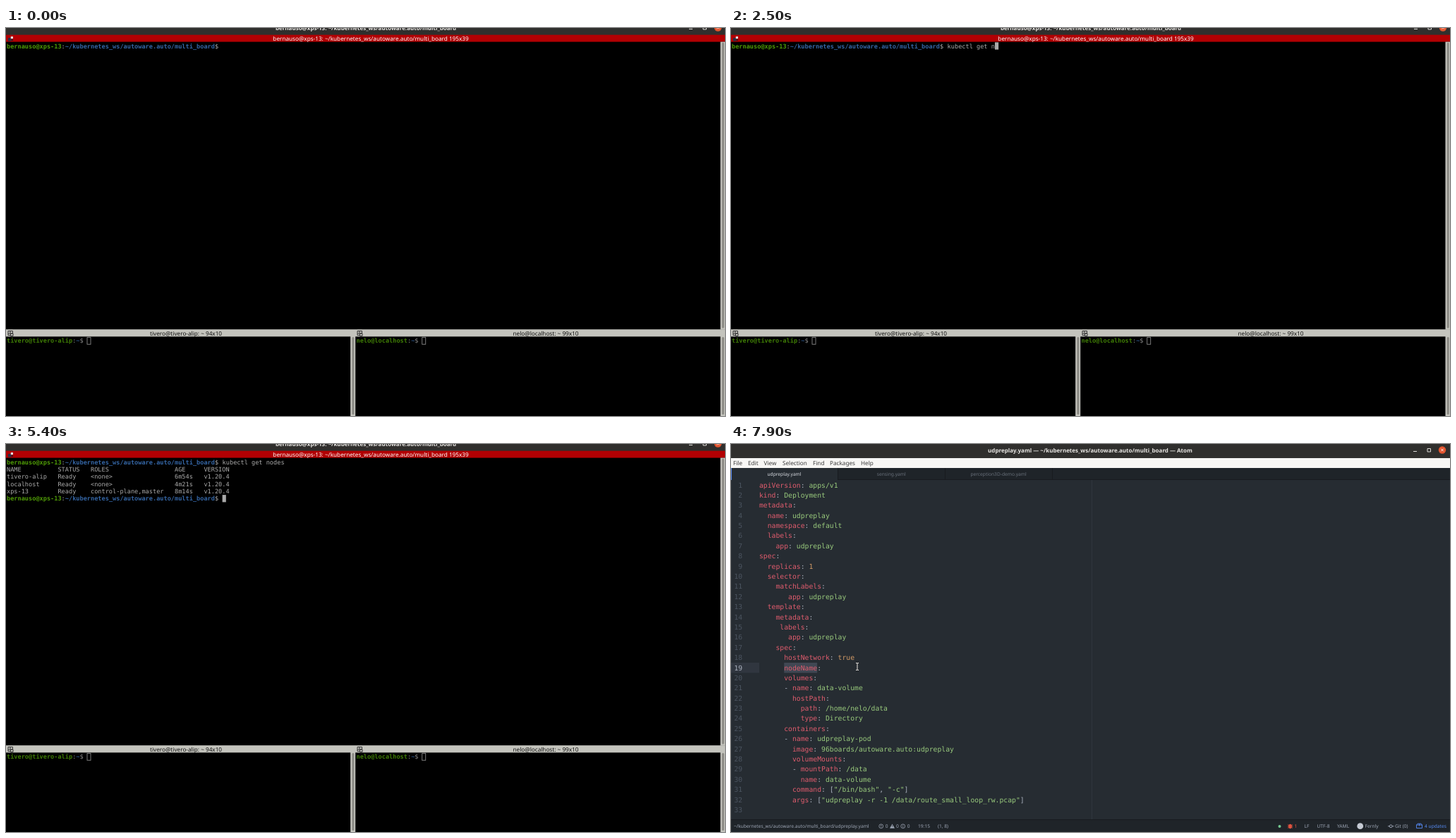
An HTML page for the animation above (8 s loop, 1019 by 550 pixels).

```html
<!DOCTYPE html>
<html lang="en">
<head>
<meta charset="utf-8">
<title>Cluster nodes</title>
<style>
  html, body { margin: 0; width: 1019px; height: 550px; overflow: hidden; background: #000; }
  svg { display: block; }
  text { white-space: pre; text-rendering: geometricPrecision; font-family: "Noto Sans", sans-serif; }
  .term, .code { font-family: "DejaVu Sans Mono", monospace; }
  .term { font-size: 8.604px; }
  .code { font-size: 9.75px; }
  .title { font-size: 8px; font-weight: bold; }
  .bar { font-size: 8.2px; }
  .small { font-size: 6.65px; }
  .b { font-weight: bold; }
</style>
</head>
<body>
<svg id="stage" width="1019" height="550" viewBox="0 0 1019 550"></svg>
<script>
const LOOP = 8000, EDITOR_AT = 6700, OUTPUT_AT = 3000;
const CELL = 5.18, ROW = 10.36, PROMPT_COLS = 59;
const CODE_CELL = 5.87, CODE_ROW = 14.39;
const FG = '#aaaaaa', DIM = '#888888', RED = '#df5c6d', GREEN = '#98c97c',
      ORANGE = '#d19a66', GREY = '#abb2bf', STATUS = '#9da5b4', BLUE = '#568af2', PANEL = '#c4c4bd';
const PATH = '~/kubernetes_ws/autoware.auto/multi_board';
const HOST = 'bernauso@xps-13';

const esc = s => s.replace(/&/g, '&amp;').replace(/</g, '&lt;');
const rect = (x, y, w, h, fill, extra = '') =>
  `<rect x="${x}" y="${y}" width="${w}" height="${h}" fill="${fill}" ${extra}/>`;
const circle = (x, y, r, fill, extra = '') =>
  `<circle cx="${x}" cy="${y}" r="${r}" fill="${fill}" ${extra}/>`;
const line = (d, stroke, w = 1) =>
  `<path d="${d}" fill="none" stroke="${stroke}" stroke-width="${w}"/>`;
const span = (s, fill, cls = '') => `<tspan fill="${fill}" class="${cls}">${esc(s)}</tspan>`;
const text = (x, y, cls, spans, extra = '') =>
  `<text x="${x}" y="${y}" class="${cls}" ${extra}>${spans}</text>`;
const label = (x, y, cls, s, fill, anchor = 'start') =>
  text(x, y, cls, span(s, fill), `text-anchor="${anchor}"`);

const colX = col => 1 + col * CELL;
const rowY = row => 28.6 + row * ROW;
const prompt = (x, y, host, path, green, blue, fg) => text(x, y, 'term',
  span(host, green, 'b') + span(':', fg) + span(path, blue, 'b') + span('$', fg));

function titleBar(s) {
  return rect(0, 0, 1019, 20, '#302f2d') +
    label(509, 12, 'title', s, '#e8e6e3', 'middle') +
    line('M967 10.5h5M987 6.5h4.5v4.5h-4.5z', '#dddbd7') +
    circle(1008, 8.5, 5.2, '#e4552f') +
    line('M1006.2 6.7l3.6 3.6m0-3.6l-3.6 3.6', '#fff', .9);
}

function scrollbar(x, y, h) {
  return rect(x, y, 7, h, PANEL) + rect(x + 2.2, y + 1, 3, h - 3, '#8a8983', 'rx="1.5"');
}

function paneTitle(x, mid, s) {
  return line(`M${x + 3} 429.5h6.5v3.5h-3v2.5h-3.5zM${x + 6.5} 433h3.5v3.5h-3.5zM${x + 6} 429.5v3.5h-3`, '#333') +
    label(mid, 435.6, 'bar', s, '#111', 'middle');
}

const hollow = x => rect(x, 438.6, 5, 9.7, 'none', `stroke="${DIM}" stroke-width=".9"`);

function terminal() {
  const rows = [
    'NAME          STATUS   ROLES                  AGE     VERSION',
    'tivero-alip   Ready    <none>                 6m54s   v1.20.4',
    'localhost     Ready    <none>                 4m21s   v1.20.4',
    'xps-13        Ready    control-plane,master   8m14s   v1.20.4'
  ];
  const mainPrompt = row => prompt(1, rowY(row), HOST, PATH, '#4e9a06', '#3465a4', FG);
  return rect(0, 0, 1019, 550, '#000') +
    `<g transform="translate(1 -9)">${titleBar(`${HOST}: ${PATH}`)}</g>` +
    rect(0, 0, 1, 9.7, '#302f2d') +
    rect(0, 9.7, 1019, 9.9, '#b20003') +
    rect(3, 14, 4.5, 4.5, '#2b2f45') + rect(6.8, 12, 3.2, 3.2, '#e4e4e4') + rect(7.5, 15.7, 2.5, 2.5, '#4a1018') +
    label(517, 17.8, 'bar', `${HOST}: ${PATH} 195x39`, '#fff', 'middle') +
    scrollbar(1012.5, 19.6, 408) + mainPrompt(0) +
    text(colX(PROMPT_COLS), rowY(0), 'term', '<tspan id="typed"></tspan>', `fill="${FG}"`) +
    `<g id="output">${rows.map((s, i) => label(1, rowY(i + 1), 'term', s, FG)).join('')}${mainPrompt(5)}</g>` +
    rect(0, 0, CELL, 10.3, FG, 'id="block"') +
    rect(0, 427.2, 1019, 10.2, PANEL) +
    paneTitle(0, 255, 'tivero@tivero-alip: ~ 94x10') +
    paneTitle(495, 765, 'nelo@localhost: ~ 99x10') +
    scrollbar(488.2, 437, 113) + scrollbar(1012.5, 437, 113) +
    prompt(1, 446.2, 'tivero@tivero-alip', '~', '#3e7b05', '#2a5183', DIM) + hollow(115) +
    prompt(496.5, 446.2, 'nelo@localhost', '~', '#3e7b05', '#2a5183', DIM) + hollow(589.7);
}

const YAML = `apiVersion: apps/v1
kind: Deployment
metadata:
  name: udpreplay
  namespace: default
  labels:
    app: udpreplay
spec:
  replicas: 1
  selector:
    matchLabels:
       app: udpreplay
  template:
    metadata:
     labels:
       app: udpreplay
    spec:
      hostNetwork: true
      nodeName:
      volumes:
      - name: data-volume
        hostPath:
          path: /home/nelo/data
          type: Directory
      containers:
      - name: udpreplay-pod
        image: 96boards/autoware.auto:udpreplay
        volumeMounts:
        - mountPath: /data
          name: data-volume
        command: ["/bin/bash", "-c"]
        args: ["udpreplay -r -1 /data/route_small_loop_rw.pcap"]
`;

function yamlSpans(s) {
  const m = s.match(/^(\s*(?:- )?)(\w+)(: ?)(.*)$/);
  if (!m) return '';
  const [, lead, key, colon, value] = m;
  const tail = value[0] === '['
    ? value.split(/("[^"]*")/).map(p => span(p, p[0] === '"' ? GREEN : GREY)).join('')
    : span(value, /^(1|true)$/.test(value) ? ORANGE : GREEN);
  return span(lead, GREY) + span(key, RED) + span(colon, GREY) + tail;
}

function statusBar() {
  const items = [
    [4, `${PATH}/udpreplay.yaml`], [218.8, '0'], [234, '0'], [249.8, '0'], [265, '19:15'], [293, '(1, 8)'],
    [798.5, '1', '#e0533f'], [812.5, 'LF'], [830.5, 'UTF-8'], [859, 'YAML'], [898.5, 'Fernly'],
    [941, 'Git (0)'], [983, '4 updates', BLUE]
  ];
  return rect(0, 532, 1019, 18, '#1f2429') + rect(0, 532, 1019, 1, '#181b1f') +
    items.map(([x, s, fill = STATUS]) => label(x, 544.2, 'small', s, fill)).join('') +
    circle(212.7, 541.8, 2.9, 'none', `stroke="${STATUS}" stroke-width=".8"`) +
    line('M212.7 540v2.2m0 .6v.8', STATUS, .8) +
    `<path d="M228.5 538.5l3.5 6.2h-7z" fill="${STATUS}"/>` + line('M228.5 540.5v2', '#1f2429', .8) +
    circle(243.7, 541.8, 2.9, 'none', `stroke="${STATUS}" stroke-width=".8"`) +
    line('M243.7 541.5v2m0-3.5v.8', STATUS, .8) +
    circle(777.5, 542, 2, '#73c990') +
    `<ellipse cx="792.5" cy="542" rx="2.3" ry="3.2" fill="#e0533f"/>` +
    line('M789 539.5l7 5m0-5l-7 5M788.8 542h7.4', '#e0533f', .8) +
    circle(891.7, 541.7, 4.4, '#c5cad3') +
    circle(935.2, 541.8, 1.9, 'none', `stroke="${STATUS}"`) +
    line('M931 541.8h2.3m3.8 0h2.3', STATUS) +
    line('M971.5 540h8v4.5h-8zM971.5 540l1.5-1.8h5l1.5 1.8M975.5 538v3.5', BLUE, .9);
}

function editor() {
  const menu = [[3, 'File'], [24, 'Edit'], [46.5, 'View'], [73, 'Selection'], [116, 'Find'], [140, 'Packages'], [184, 'Help']];
  const tabs = ['udpreplay.yaml', 'sensing.yaml', 'perception3D-demo.yaml'];
  const lineTop = 51 + 18 * CODE_ROW;
  return rect(0, 0, 1019, 550, '#262c32') +
    titleBar(`udpreplay.yaml — ${PATH} — Atom`) +
    rect(0, 20, 1019, 14, '#f7f6f4') +
    menu.map(([x, s]) => label(x, 29.9, 'bar', s, '#3a3a3a')).join('') +
    rect(0, 34, 1019, 17, '#1f2429') + rect(0, 50, 1019, 1, '#181b1f') +
    rect(0, 34, 151, 17, '#262c32') + rect(0, 34, 1, 17, BLUE) +
    tabs.map((s, i) => rect(151 + 152 * i, 34, 1, 17, '#181b1f') +
      label(75.5 + 151.8 * i, 44.8, 'small', s, i ? '#69707b' : '#d7dae0', 'middle')).join('') +
    rect(511, 51, 1, 481, '#30363d') +
    rect(0, lineTop, 40, CODE_ROW, '#30363f') +
    rect(75.2, lineTop, 8 * CODE_CELL, CODE_ROW, '#404753') +
    YAML.split('\n').map((s, i) => {
      const y = 61.5 + i * CODE_ROW;
      return label(16.2, y, 'code', `${i + 1}`, i === 18 ? GREY : '#4b5460', 'end') +
        text(40, y, 'code', yamlSpans(s));
    }).join('') +
    rect(122.2, lineTop, 1.3, CODE_ROW, '#528bff', 'id="caret"') +
    statusBar();
}

const ibeam = 'M-2-5h1.5l.5.5l.5-.5h1.5M0-4.5v9M-2 5h1.5l.5-.5l.5.5h1.5';
document.getElementById('stage').innerHTML =
  `<g id="terminal">${terminal()}</g><g id="editor">${editor()}</g>` +
  `<g id="mouse">${line(ibeam, '#222', 2)}${line(ibeam, '#f2f2f2', 1)}</g>`;

const typing = [
  [0, ''], [400, 'k'], [700, 'ku'], [900, 'kub'], [1000, 'kube'], [1200, 'kubec'], [1400, 'kubectl '],
  [2000, 'kubectl g'], [2100, 'kubectl ge'], [2200, 'kubectl get'], [2400, 'kubectl get '],
  [2500, 'kubectl get n'], [2600, 'kubectl get no'], [2700, 'kubectl get nodes ']
];
// Pointer: time, x, y; no position means hidden.
const pointer = [
  [0], [4200, 288.5, 120], [4300], [4600, 30, 20], [4700, 32, 27], [4800, 33, 37], [4900, 34, 48],
  [5100, 35, 66], [5200, 37, 83], [5300, 39, 99], [5400],
  [7300, 215, 315.5], [7500, 255, 284], [7600, 301, 248], [7700, 274, 264], [7800, 222, 295], [7900, 179, 315.5]
];
const at = (list, t) => list.findLast(e => e[0] <= t);
const $ = id => document.getElementById(id);
const show = (id, on) => $(id).setAttribute('visibility', on ? 'inherit' : 'hidden');
const move = (id, x, y) => $(id).setAttribute('transform', `translate(${x} ${y})`);

function draw(t) {
  const inEditor = t >= EDITOR_AT, done = t >= OUTPUT_AT;
  show('terminal', !inEditor);
  show('editor', inEditor);

  const typed = at(typing, t)[1];
  $('typed').textContent = typed;
  show('output', done && !inEditor);
  show('block', !inEditor && (done
    ? Math.floor((t - OUTPUT_AT) / 600) % 2 === 0
    : t >= 100 && !(t >= 1900 && t < 2000)));
  move('block', colX(PROMPT_COLS + (done ? 0 : typed.length)), 20.3 + (done ? 5 * ROW : 0));

  show('caret', inEditor && (t < 7000 || (t >= 7500 && t < 7900)));
  const [, x, y] = at(pointer, t);
  show('mouse', x !== undefined);
  if (x !== undefined) move('mouse', x, y);
}

function tick() {
  draw(performance.now() % LOOP);
  requestAnimationFrame(tick);
}
tick();
</script>
</body>
</html>
```
